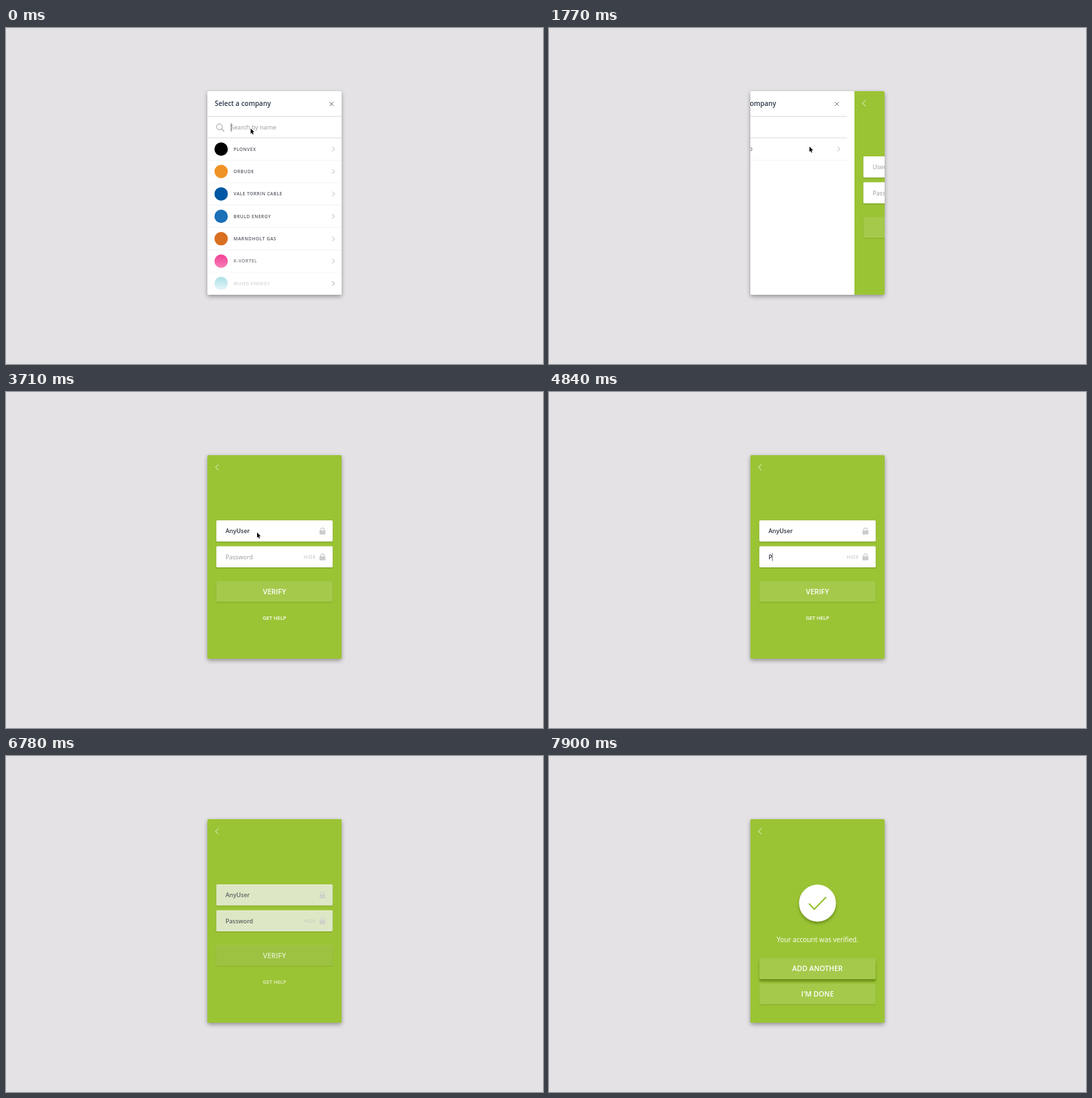
Animation of 800x500 px, one loop 8900 ms. Source, as an HTML page with a canvas:

```html
<!DOCTYPE html>
<html lang="en">
<head>
<meta charset="utf-8">
<title>Account verification</title>
<style>
  html, body { margin: 0; width: 100%; height: 100%; overflow: hidden; background: #e4e2e5; }
  canvas { display: block; width: 800px; height: 500px; }
</style>
</head>
<body>
<canvas id="stage"></canvas>
<script>
const LOOP = 8900, STEP = 160;
const GREEN = '#9bc435', BUTTON = '#a5c94b', INK = '#30353f', HINT = '#999';
const CARD = { x: 300, y: 94, w: 200, h: 303 };
const QUERY = 'Buvo', USER = 'AnyUser', SECRET = 'Password';
const COMPANIES = [
  ['PLONVEX', '#000'],
  ['ORBUDE', '#f09326'],
  ['VALE TORRIN CABLE', '#0057a3'],
  ['BRULD ENERGY', '#1b70b8'],
  ['MARNDHOLT GAS', '#d96f20'],
  ['K-VORTEL', '#f23691'],
  ['WUND ENERGY', '#35b4c6']
];
// Bursts of motion: [start, number of steps]
const BURSTS = [[160, 6], [1290, 7], [2410, 1], [2900, 4], [3710, 5], [4680, 6], [5980, 7], [7100, 6]];
// Pointer stops: [time, x, y]
const PATHS = [
  [[0, 364.5, 149.5], [160, 364.5, 149.5]],
  [[1290, 372, 158], [1450, 388, 176.5], [1770, 388, 176.5], [2250, 377, 202.5], [2410, 374, 205.5], [2900, 374, 205.5]],
  [[3710, 374, 209], [4030, 372, 240], [4190, 371, 244], [4680, 371, 244]],
  [[5980, 371, 252], [6140, 371.5, 280], [6300, 371.5, 295], [6620, 371.5, 295]]
];

const canvas = document.getElementById('stage');
const ctx = canvas.getContext('2d');
const dpr = window.devicePixelRatio || 1;
canvas.width = 800 * dpr;
canvas.height = 500 * dpr;

const clamp = v => Math.max(0, Math.min(1, v));
const span = (t, a, b) => clamp((t - a) / (b - a));
const inOut = u => u < .5 ? 4 * u ** 3 : 1 - (2 - 2 * u) ** 3 / 2;

function snap(t) {
  let out = 0;
  for (const [start, count] of BURSTS)
    if (t >= start) out = start + STEP * Math.min(count - 1, Math.floor((t - start) / STEP));
  return out;
}

function group(alpha, dx, draw) {
  if (alpha <= 0) return;
  ctx.save();
  ctx.globalAlpha *= alpha;
  ctx.translate(dx, 0);
  draw();
  ctx.restore();
}

function text(str, x, y, size, color, { weight = 400, gap = 0, align = 'left' } = {}) {
  ctx.font = `${weight} ${size}px "Open Sans", "Noto Sans", sans-serif`;
  ctx.letterSpacing = gap + 'px';
  ctx.textAlign = align;
  ctx.fillStyle = color;
  ctx.fillText(str, x, y);
  return ctx.measureText(str).width;
}

function line(points, color, width = 1) {
  ctx.beginPath();
  points.forEach(([x, y]) => ctx.lineTo(x, y));
  ctx.strokeStyle = color;
  ctx.lineWidth = width;
  ctx.stroke();
}

function disc(x, y, r, color) {
  ctx.beginPath();
  ctx.arc(x, y, r, 0, Math.PI * 2);
  ctx.fillStyle = color;
  ctx.fill();
}

function arc(x, y, r, from, to, color, width) {
  ctx.beginPath();
  ctx.arc(x, y, r, from, to);
  ctx.strokeStyle = color;
  ctx.lineWidth = width;
  ctx.stroke();
}

function shadow(color, dy, blur) {
  ctx.shadowColor = color;
  ctx.shadowOffsetY = dy * dpr;
  ctx.shadowBlur = blur * dpr;
}

function box(x, y, w, h, color, r = 1.5) {
  ctx.beginPath();
  ctx.roundRect(x, y, w, h, r);
  ctx.fillStyle = color;
  ctx.fill();
}

function raised(x, y, w, h, color, dy, blur, shade, r) {
  ctx.save();
  shadow(shade, dy, blur);
  box(x, y, w, h, color, r);
  ctx.restore();
}

function caret(x, y) {
  line([[x, y - 6], [x, y + 6]], '#555', .9);
}

function chevron(x, y, dir, size, color) {
  line([[x - dir * size / 2, y - size], [x + dir * size / 2, y], [x - dir * size / 2, y + size]], color, .9);
}

// Text field content: hint while empty, caret after the typed part
function entry(typed, hint, x, y, active) {
  let w = 0;
  if (typed) w = text(typed, x, y, 8.9, INK, { weight: 600 });
  else text(hint, x, y, 9.1, HINT);
  if (active) caret(x + w + .4, y - 3.2);
}

function row(y, [name, color]) {
  disc(320.5, y, 10, color);
  text(name, 339, y + 2.5, 6.7, '#555a62', { weight: 600, gap: .5 });
  line([[300, y + 16.5], [500, y + 16.5]], '#efeff1', .8);
}

function listView(t) {
  const typed = QUERY.slice(0, t < 160 ? 0 : Math.floor(t / STEP));
  text('Select a company', 311, 116.2, 9.95, '#2c3648', { weight: 600 });
  line([[482, 110], [488, 116]], '#777');
  line([[488, 110], [482, 116]], '#777');
  line([[300, 131.5], [500, 131.5]], '#dddde0');
  line([[300, 163.5], [500, 163.5]], '#dddde0');
  arc(318, 147.2, 4.3, 0, Math.PI * 2, '#999', 1);
  line([[321.2, 150.4], [325, 154.2]], '#999', 1.1);
  entry(typed, 'Search by name', 335, 151.2, t < 1290);

  group(1 - span(t, 300, 800), 0, () => {
    const rowY = i => 180.2 + i * 33.35;
    COMPANIES.forEach((c, i) => row(rowY(i), c));
    const veil = ctx.createLinearGradient(0, 334, 0, 397);
    veil.addColorStop(0, 'rgba(255,255,255,0)');
    veil.addColorStop(1, '#fff');
    ctx.fillStyle = veil;
    ctx.fillRect(300, 334, 200, 63);
    COMPANIES.forEach((c, i) => chevron(487.7, rowY(i), 1, 3.4, i < 6 ? '#aaa' : '#888'));
  });
  group(span(t, 500, 960), 0, () => {
    row(180.2, [QUERY.toUpperCase(), GREEN]);
    chevron(487.7, 180.2, 1, 3.4, '#aaa');
  });
}

function lock(x, y) {
  box(x - 4.4, y - 1, 8.8, 6, '#ccc', .8);
  ctx.beginPath();
  ctx.moveTo(x - 2.7, y);
  ctx.lineTo(x - 2.7, y - 2);
  ctx.arc(x, y - 2, 2.7, Math.PI, 0);
  ctx.lineTo(x + 2.7, y);
  ctx.strokeStyle = '#ccc';
  ctx.lineWidth = 1.2;
  ctx.stroke();
}

function button(label, y, lift) {
  raised(313.3, y, 173.4, 31, BUTTON, 1 + 2.6 * lift, 1.5 + 1.5 * lift, `rgba(70,100,0,${.28 + .27 * lift})`);
  text(label, 400, y + 19.4, 10.6, '#fff', { weight: 600, align: 'center' });
}

function field(y) {
  raised(313.3, y, 173.4, 31.6, '#fff', 1, 2, 'rgba(60,90,0,.4)');
  lock(471.4, y + 16);
}

function formView(t) {
  const userLen = t < 2900 ? 0 : Math.ceil(((t - 2900) / STEP + 1) * 1.75);
  const secretLen = t < 4840 ? 0 : Math.floor(1 + (t - 4840) / STEP * 1.75);
  field(191);
  field(229.5);
  entry(USER.slice(0, userLen), 'Username', 327, 210.4, t >= 2410 && t < 3710);
  entry(SECRET.slice(0, secretLen), 'Password', 327, 248.8, t >= 4190 && t < 5980);
  text('HIDE', 443.3, 248.3, 7.2, '#bbb', { gap: .5 });
  button('VERIFY', 281.2, t >= 6300 && t < 6460 ? 1 : 0);
  text('GET HELP', 400, 339.3, 7.7, '#fff', { weight: 600, align: 'center' });
}

function badge(t) {
  const x = 400, y = 219, sweep = span(t, 6780, 7330);
  const fill = span(t, 7330, 7660), tick = span(t, 7560, 7860);
  if (sweep > 0) {
    arc(x, y, 26.5, 0, Math.PI * 2, 'rgba(255,255,255,.55)', .6);
    arc(x, y, 26.5, 0, Math.PI * 2 * sweep, '#fff', 2);
  }
  if (fill > 0) {
    ctx.save();
    shadow(`rgba(60,90,0,${.5 * fill})`, 3, 4);
    group(fill, 0, () => disc(x, y, 27.4, '#fff'));
    ctx.restore();
  }
  if (tick > 0) {
    const a = Math.min(1, tick * 3), b = clamp((tick * 3 - 1) / 2);
    const pts = [[387.3, 219.5], [387.3 + 7.9 * a, 219.5 + 8.5 * a]];
    if (b > 0) pts.push([395.2 + 17.6 * b, 228 - 18 * b]);
    line(pts, '#92be2b', 2);
  }
}

function doneView(t) {
  text('Your account was verified.', 400, 277.2, 10, '#fff', { align: 'center' });
  button('ADD ANOTHER', 301, span(t, 7740, 7900));
  button("I'M DONE", 338.6, 0);
}

function pointer(t) {
  for (const path of PATHS) {
    const end = path.length - 1;
    if (t < path[0][0] || t >= path[end][0]) continue;
    const i = path.findIndex((p, k) => k < end && t < path[k + 1][0]);
    const [t0, x0, y0] = path[i], [t1, x1, y1] = path[i + 1];
    const u = span(t, t0, t1);
    ctx.save();
    ctx.translate(x0 + (x1 - x0) * u, y0 + (y1 - y0) * u);
    ctx.beginPath();
    [[0, 0], [0, 7.8], [1.7, 6.3], [2.9, 9], [4.2, 8.4], [3, 5.8], [5.4, 5.6]].forEach(p => ctx.lineTo(...p));
    ctx.closePath();
    ctx.strokeStyle = 'rgba(255,255,255,.8)';
    ctx.lineWidth = 1;
    ctx.stroke();
    ctx.fillStyle = '#000';
    ctx.fill();
    ctx.restore();
  }
}

function draw(t) {
  const { x, y, w, h } = CARD;
  const leave = inOut(span(t, 1440, 2240)), enter = inOut(span(t, 1472, 2250));
  ctx.setTransform(dpr, 0, 0, dpr, 0, 0);
  ctx.fillStyle = '#e4e2e5';
  ctx.fillRect(0, 0, 800, 500);
  raised(x, y, w, h, enter < 1 ? '#fff' : GREEN, 2.5, 6, 'rgba(0,0,0,.36)', 2);

  ctx.save();
  ctx.beginPath();
  ctx.roundRect(x, y, w, h, 2);
  ctx.clip();
  if (leave < 1) group(1, -w * leave, () => listView(t));
  if (enter > 0) group(clamp(.82 + enter), w * (1 - enter), () => {
    ctx.fillStyle = GREEN;
    ctx.fillRect(x, y, w, h);
    chevron(314.3, 112, -1, 4.4, 'rgba(255,255,255,.9)');
    group(1 - span(t, 6600, 7285), 0, () => formView(t));
    group(span(t, 6780, 7260), 0, () => doneView(t));
    badge(t);
  });
  ctx.restore();
  pointer(t);
}

function tick() {
  draw(snap(performance.now() % LOOP));
  requestAnimationFrame(tick);
}
tick();
</script>
</body>
</html>
```
